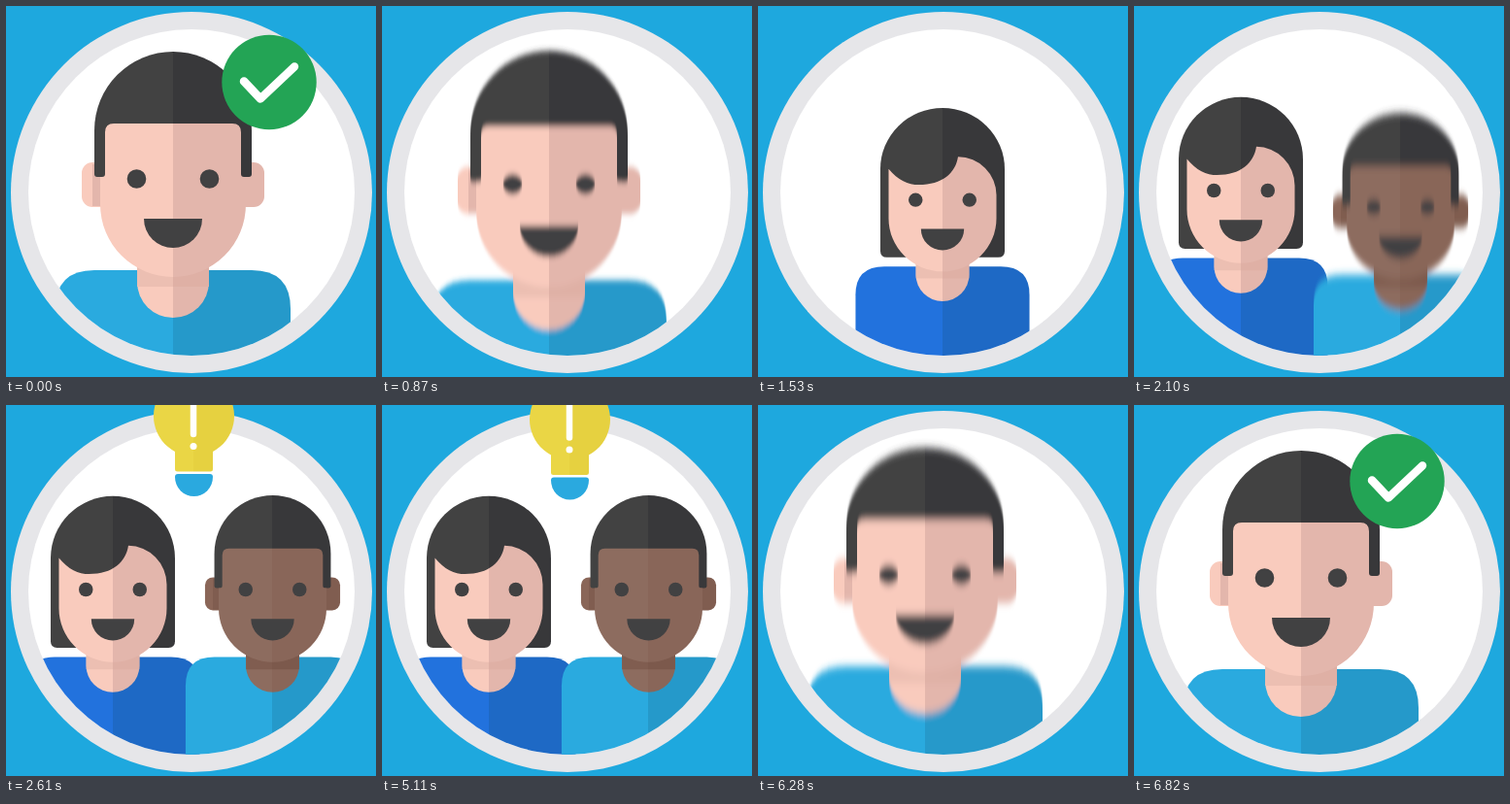
Recreate the animation shown at these times as an HTML page. Size 381 by 382 pixels, loop 8820 ms.

```html
<!DOCTYPE html>
<html>
<head>
<meta charset="utf-8">
<style>
  html, body { margin: 0; width: 100%; height: 100%; overflow: hidden; background: #1ea8de; }
  svg { display: block; width: 100vw; height: 100vh; }
</style>
</head>
<body>
<svg id="stage" viewBox="0 0 381 382"></svg>
<script>
const LOOP = 8820;
const EXIT = 300;
const stage = document.getElementById('stage');

// Two flat tones that meet at the middle of a symmetric shape
const split = (id, left, right) =>
  `<linearGradient id="${id}"><stop offset=".5" stop-color="${left}"/><stop offset=".5" stop-color="${right}"/></linearGradient>`;

const blurFilter = id =>
  `<filter id="blur-${id}" x="-10%" width="120%" y="-10%" height="120%"><feGaussianBlur stdDeviation="0 0"/></filter>`;

const ear = (x, fill) => `<rect x="${x}" y="161" width="34" height="46" rx="11" fill="${fill}"/>`;

const shortHair = (skin, lobe, shade) => `
  ${ear(-94, lobe)}${ear(60, shade)}
  <rect x="-83" y="163" width="12" height="43" fill="${shade}"/>
  <path fill="url(#hair)" d="M-81 128a81 81 0 0 1 162 0V173q0 3-3 3H-78q-3 0-3-3Z"/>
  <path fill="url(#${skin})" d="M-70 130q0-9 9-9H61q9 0 9 9V173q0 3 3 3H75V204A75 75 0 0 1-75 204V176H-73q3 0 3-3Z"/>`;

const longHair = skin => `
  <path fill="url(#hair)" d="M-86.5 134.5a86.5 86.5 0 0 1 173 0V250q0 9-9 9H-77.5q-9 0-9-9Z"/>
  <path fill="url(#${skin})" d="M-75 134C-62 150-48 156.5-33 156.5C0 156.5 18 140 21.6 117A54 54 0 0 1 75 171V204A75 75 0 0 1-75 204Z"/>`;

// Drawn around the centre line, with the eyes at height 178
function figure(id, { shirt, skin, shadow, head }) {
  const neck = (fill, d) => `<path fill="url(#${fill})" d="${d}"/>`;
  const torso = `<path fill="url(#${shirt})" d="M-121 460V312q0-40 40-40H81q40 0 40 40V460Z"/>
    ${neck(skin, 'M-37 240H37V284A37 37 0 0 1-37 284Z')}
    ${neck(shadow, 'M-37 240H37V289H-37Z')}`;
  const face = `<circle cx="-37.5" cy="178" r="9.8"/><circle cx="37.5" cy="178" r="9.8"/>
    <path d="M-30 219H30A30 30 0 0 1-30 219Z"/>`;
  // Long hair hangs behind the neck, so the torso is drawn first only for short hair
  return `<g id="${id}"><g transform="translate(0 -178)">${torso}${head}<g fill="#414142">${face}</g></g></g>`;
}

stage.innerHTML = `
  <defs>
    ${split('hair', '#424242', '#38383a')}
    ${split('light', '#f9cbbd', '#e3b6ac')}
    ${split('lightShadow', '#ecbfb2', '#dfb0a5')}
    ${split('dark', '#8d6c5f', '#896659')}
    ${split('darkShadow', '#805d50', '#7c594c')}
    ${split('cyan', '#2aaadf', '#2599ca')}
    ${split('blue', '#2272dd', '#1e69c5')}
    ${split('yellow', '#ead645', '#e6d140')}
    ${['man', 'woman', 'friend'].map(blurFilter).join('')}
    <clipPath id="porthole"><circle cx="191" cy="192" r="168"/></clipPath>
  </defs>
  <circle cx="191" cy="192" r="186" fill="#e6e6e9"/>
  <circle cx="191" cy="192" r="168" fill="#fff"/>
  <g clip-path="url(#porthole)">
    ${figure('man', { shirt: 'cyan', skin: 'light', shadow: 'lightShadow', head: shortHair('light', '#f9cbbd', '#e3b6ac') })}
    ${figure('woman', { shirt: 'blue', skin: 'light', shadow: 'lightShadow', head: longHair('light') })}
    ${figure('friend', { shirt: 'cyan', skin: 'dark', shadow: 'darkShadow', head: shortHair('dark', '#8a6658', '#805d50') })}
  </g>
  <g id="bulb">
    <path fill="url(#yellow)" d="M174 48A41.5 41.5 0 1 1 213 48V66q0 2.5-2.5 2.5H176.5q-2.5 0-2.5-2.5Z"/>
    <path fill="#2aa9df" d="M177 71H210q3 0 3 3a19.5 20 0 0 1-39 0q0-3 3-3Z"/>
    <path d="M193 -8V30" stroke="#fff" stroke-width="6.5" stroke-linecap="round"/>
    <circle cx="193" cy="42.5" r="3.5" fill="#fff"/>
  </g>
  <g id="badge">
    <circle r="48.7" fill="#23a455"/>
    <path d="M-26-1L-9 17L26-16" fill="none" stroke="#fff" stroke-width="8.5" stroke-linecap="round" stroke-linejoin="round"/>
  </g>`;

const el = id => document.getElementById(id);
const part = (t, from, to) => Math.min(1, Math.max(0, (t - from) / (to - from)));
const smooth = u => u * u * (3 - 2 * u);
const outBack = u => 1 + 2.4 * (u - 1) ** 3 + 1.4 * (u - 1) ** 2;

function keyed(t, keys) {
  const i = keys.findIndex(k => t < k[0]);
  if (i < 0) return keys[keys.length - 1][1];
  if (i === 0) return keys[0][1];
  const [[t0, a], [t1, b]] = [keys[i - 1], keys[i]];
  return a + (b - a) * smooth(part(t, t0, t1));
}

// Distance below the resting place
const drop = (t, { enter, leave, depth }) =>
  depth * (1 - outBack(part(t, enter, enter + 420))) + depth * part(t, leave, leave + EXIT) ** 4;

function place(id, t, cast, x, low = 0) {
  const g = el(id);
  const shown = t > cast.enter && t < cast.leave + EXIT;
  g.setAttribute('display', shown ? 'inline' : 'none');
  if (!shown) return;
  const speed = Math.abs(drop(t + 1, cast) - drop(t - 1, cast)) / 2;
  const blur = Math.min(4, 14 * speed);
  const stretch = 1 + .055 * Math.sin(Math.PI * part(t, cast.leave, cast.leave + EXIT)) - .015 * low;
  const y = cast.eyes + drop(t, cast) + 9.7 * low;
  g.setAttribute('transform', `translate(${x} ${y}) scale(${cast.size} ${cast.size * stretch})`);
  if (blur > .3) {
    el('blur-' + id).firstChild.setAttribute('stdDeviation', `0 ${blur / cast.size}`);
    g.setAttribute('filter', `url(#blur-${id})`);
  } else g.removeAttribute('filter');
}

const man = { enter: 6100, leave: LOOP + 762, depth: 330, eyes: 178, size: 1 };
const woman = { enter: 1100, leave: 5602, depth: 290, eyes: 190, size: .74 };
const friend = { enter: 1950, leave: 5650, depth: 290, eyes: 190, size: .74 };

function draw(t) {
  const late = t < 3000 ? t + LOOP : t;
  place('man', late, man, 172);
  const aside = smooth(part(t, 1620, 2050));
  place('woman', t, woman, 190 - 80 * aside, 1 - aside);
  place('friend', t, friend, 274.5);

  const bulbY = t < 5110
    ? -110 * (1 - outBack(part(t, 2200, 2610)))
    : keyed(t, [[5110, 3.5], [5170, 3.5], [5350, 10], [5650, -110]]);
  el('bulb').setAttribute('transform', `translate(0 ${bulbY})`);

  const size = keyed(late, [[6400, 0], [6600, 1.2], [6720, .95], [6820, 1],
    [LOOP + 30, 1], [LOOP + 380, 1.2], [LOOP + 780, 0]]);
  el('badge').setAttribute('transform', `translate(271 78.5) scale(${size})`);
}

let start;
function tick(now) {
  start ??= now;
  draw((now - start) % LOOP);
  requestAnimationFrame(tick);
}
draw(0);
requestAnimationFrame(tick);
</script>
</body>
</html>
```
